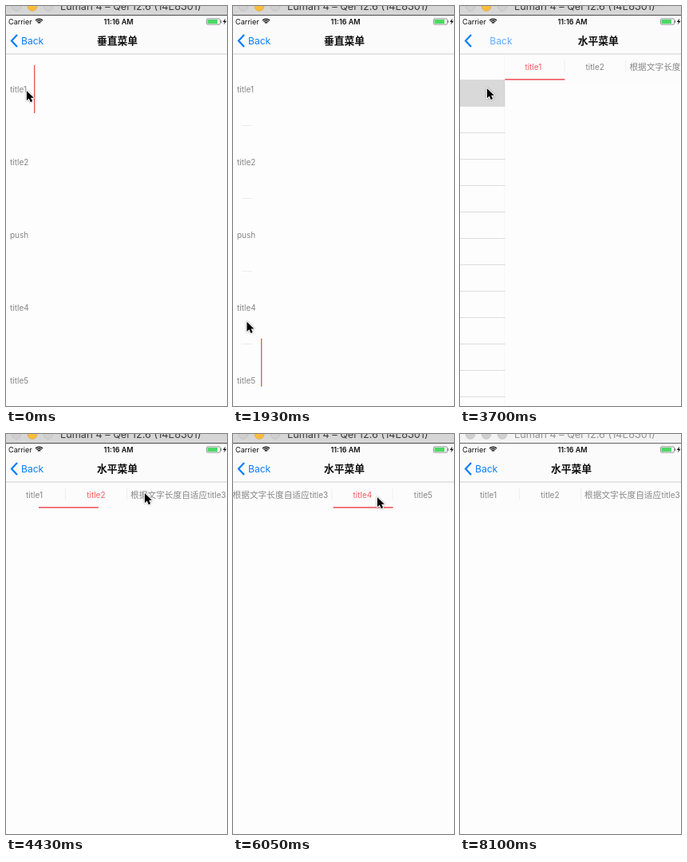
These frames come from a looping animation (277 by 500 pixels, 8.2 s). An HTML page with a canvas:

```html
<!DOCTYPE html>
<html lang="zh">
<head>
<meta charset="utf-8">
<title>Page menu</title>
<style>
html, body { margin: 0; height: 100%; overflow: hidden; background: #fff; }
canvas { display: block; width: 277px; height: 500px; }
</style>
</head>
<body>
<canvas id="stage"></canvas>
<script>
const W = 277, H = 500, LOOP = 8200, STEP = 147, LAST = 55;
const FONT = 'Inter, "Noto Sans CJK SC", "Noto Sans CJK", sans-serif';
const GREY = '#868686', RED = '#f75b60', BLUE = '#087eff', PAGE = '#fdfdfd';
const canvas = document.getElementById('stage');
const g = canvas.getContext('2d');
const dpr = window.devicePixelRatio || 1;
canvas.width = W * dpr;
canvas.height = H * dpr;

const clamp = (x, lo = 0, hi = 1) => Math.min(hi, Math.max(lo, x));
const smooth = x => (x = clamp(x), x * x * (3 - 2 * x));
const easeOut = x => 1 - (1 - clamp(x)) ** 3;
const track = (value, moves, u) => moves.reduce(
  (v, [start, to, span = 2]) => v + (to - v) * smooth((u - start) / span), value);

// Vertical menu: equal rows, a line that follows the chosen one.
const rowY = i => 90.9 * i;
const rowPicks = [[3.4, 1], [8.6, 3], [11.64, 4]];

// Horizontal menu: equal tabs, except that the long third one is wider.
const LONG = 2, EXTRA = 53.5;
const tabX = i => 76.2 * i + (i > LONG ? EXTRA : 0);
const tabW = i => 75 + (i === LONG ? EXTRA : 0);
const tabPicks = [28.95, 31.5, 34.84, 47.17];
const tabTrack = f => u => track(f(0), tabPicks.map((t, i) => [t, f(i + 1)]), u);
const barX = tabTrack(tabX), barW = tabTrack(tabW);
const centred = i => clamp(tabX(i) + tabW(i) / 2 - W / 2, 0, tabX(5) - 1 - W);
const drags = [[41, 94, 3], [50.5, 0, 2.5]];
const scrolls = [...tabPicks.map((t, i) => [t, centred(i + 1)]), ...drags]
  .sort((a, b) => a[0] - b[0]);

const POP = 18.92, PUSH = 23.6, SLIDE = 3.4;

// Pointer glides: start, x, y, span
const glides = [
  [1, 18, 195, 3], [4, 11, 372, 5], [9, 15, 467, 2], [11.68, 24, 42, 5],
  [19, 33, 102, 2], [25, 113, 75, 3], [29, 173, 73, 1], [32.5, 215, 75, 2],
  [39, 180, 78, 2], [41, 242, 78, 3], [45, 265, 78, 1.5], [47.17, 142, 78, 2],
  [50.5, 270, 78, 2.5], [53, 270, -30, 2]
];

function text(str, x, y, size, color, weight = 400, align = 'left') {
  g.font = `${weight} ${size}px ${FONT}`;
  g.textAlign = align;
  g.fillStyle = color;
  g.fillText(str, x, y);
}

function rect(x, y, w, h, color) {
  g.fillStyle = color;
  g.fillRect(x, y, w, h);
}

function path(points, close) {
  g.beginPath();
  points.forEach(([x, y]) => g.lineTo(x, y));
  if (close) g.closePath();
}

function faded(alpha, draw) {
  g.save();
  g.globalAlpha = clamp(alpha);
  draw();
  g.restore();
}

function shifted(x, draw) {
  g.save();
  g.translate(x, 0);
  draw();
  g.restore();
}

function drawList(u) {
  rect(0, 60, W, H - 60, PAGE);
  if (u >= 23) rect(0, 93, W, 33, '#d9d9d9');
  ['竖直菜单', '水平菜单'].forEach((name, i) => text(name, 10, 80.5 + 33 * i, 12.8, '#111'));
  for (let y = 92; y < H; y += 33) rect(10, y, W, 1, '#dcdcde');
}

function drawVertical(u) {
  rect(0, 60, W, H - 60, PAGE);
  ['title1', 'title2', 'push', 'title4', 'title5'].forEach((name, i) => {
    text(name, 5, 108 + rowY(i), 10, GREY);
    if (i < 4 && u > 2 + 2.5 * i) rect(11, Math.floor(149.6 + rowY(i)), 13, 1, '#ededed');
  });
  const moves = rowPicks.map(([t, row]) => [t, 74 + rowY(row)]);
  rect(35, track(74, moves, u), 1.3, 60, '#ee5055');
}

function drawHorizontal(u) {
  rect(0, 60, W, H - 60, PAGE);
  rect(0, 60, W, 37, '#fcfcfc');
  const active = tabPicks.filter(t => u >= t).length;
  shifted(-track(0, scrolls, u), () => {
    for (let i = 0; i < 5; i++) {
      const x = tabX(i), color = i === active ? RED : GREY;
      if (i === LONG) text('根据文字长度自适应', x + 3.6, 79.5, 10.7, color);
      text('title' + (i + 1), x + (i === LONG ? 100 : 25), 79.5, 10, color);
      if (i) rect(Math.floor(x - 1.4), 68, 1, 15, '#efefef');
    }
    rect(barX(u), 91, barW(u), 1.6, '#f1585f');
  });
}

function drawNav(heading, p) {
  rect(0, 12, W, 48, '#fbfbfb');
  rect(0, 59.5, W, 1, '#cfcfd1');
  faded(p ** 25, () => text('CTCyclePageMenu Example List',
    138 - 110 * (1 - p) ** 2, 48, 12.3, '#111', 600, 'center'));
  faded(3 * (1 - p), () => text(heading, 139.5 + 166 * p, 48, 12.8, '#111', 700, 'center'));
  faded(1.5 * (1 - p), () => {
    path([[14, 36], [7, 43.5], [14, 51]]);
    g.lineWidth = 2.2;
    g.strokeStyle = BLUE;
    g.stroke();
  });
  faded((1 - p) ** 2, () => text('Back', 19 + 90 * p, 48, 12.1, BLUE));
}

function drawStatus() {
  text('Carrier', 3, 22.7, 9.1, '#111');
  text('11:16 AM', 141, 22.7, 9, '#111', 600, 'center');
  g.strokeStyle = '#111';
  g.lineWidth = 1.3;
  for (let r = 2.4; r < 7; r += 2.2) {
    g.beginPath();
    g.arc(41.5, 23, r, -2.3, -0.84);
    g.stroke();
  }
  g.strokeStyle = '#777';
  g.lineWidth = 0.8;
  g.beginPath();
  g.roundRect(251.4, 15.9, 17.2, 7.2, 1.5);
  g.stroke();
  rect(252.5, 17, 12.5, 5, '#4cd964');
  rect(269.2, 18, 1, 3, '#777');
  path([[275, 15.5], [271.8, 20], [274, 20], [272.8, 23.5], [276.5, 18.7], [274.3, 18.7]], true);
  g.fillStyle = '#111';
  g.fill();
}

function drawWindowBar(active) {
  rect(0, 0, W, 11, active ? '#d6d6d6' : '#f3f3f3');
  rect(0, 11, W, 1, active ? '#4c4c4c' : '#666');
  for (let i = 0; i < 3; i++) {
    const lit = active && i === 1;
    g.beginPath();
    g.arc(13 + 20 * i, 0.5, 5.8, 0, 7);
    g.fillStyle = lit ? '#fcbd3c' : '#cfcfcf';
    g.fill();
    g.lineWidth = 0.7;
    g.strokeStyle = lit ? '#e0a033' : '#bdbdbd';
    g.stroke();
  }
  text('Lumari 4 – Qel 12.6 (14E8301)', 68, 5, 12.7, active ? '#3c3c3c' : '#929292');
}

function drawPointer(u) {
  const x = track(25, glides.map(([t, x, , span]) => [t, x, span]), u);
  const y = track(105, glides.map(([t, , y, span]) => [t, y, span]), u);
  g.save();
  g.translate(x, y);
  g.scale(0.88, 0.88);
  path([[1, 1], [1, 15], [4.3, 12], [6.6, 17.2], [9.2, 16], [6.9, 11], [11.2, 11]], true);
  g.fillStyle = '#000';
  g.strokeStyle = '#fff';
  g.lineWidth = 2.4;
  g.lineJoin = 'round';
  g.shadowColor = 'rgba(0,0,0,.4)';
  g.shadowBlur = 2 * dpr;
  g.stroke();
  g.shadowColor = 'transparent';
  g.fill();
  g.restore();
}

function draw(u) {
  const late = u >= PUSH;
  const p = late ? 1 - easeOut((u - PUSH) / SLIDE) : easeOut((u - POP) / SLIDE);
  g.setTransform(dpr, 0, 0, dpr, 0, 0);
  rect(0, 0, W, H, PAGE);
  if (p > 0) shifted(-83 * (1 - p), () => drawList(u));
  if (p < 1) shifted(W * p, () => {
    if (p > 0) rect(-1, 60, 1, H, 'rgba(0,0,0,.04)');
    (late ? drawHorizontal : drawVertical)(u);
  });
  drawNav(late ? '水平菜单' : '垂直菜单', p);
  drawStatus();
  drawWindowBar(u < LAST);
  drawPointer(u);
}

const begin = performance.now();
function tick() {
  const t = (performance.now() - begin) % LOOP;
  draw(Math.min(LAST, Math.floor(t / STEP)));
  requestAnimationFrame(tick);
}
tick();
</script>
</body>
</html>
```
